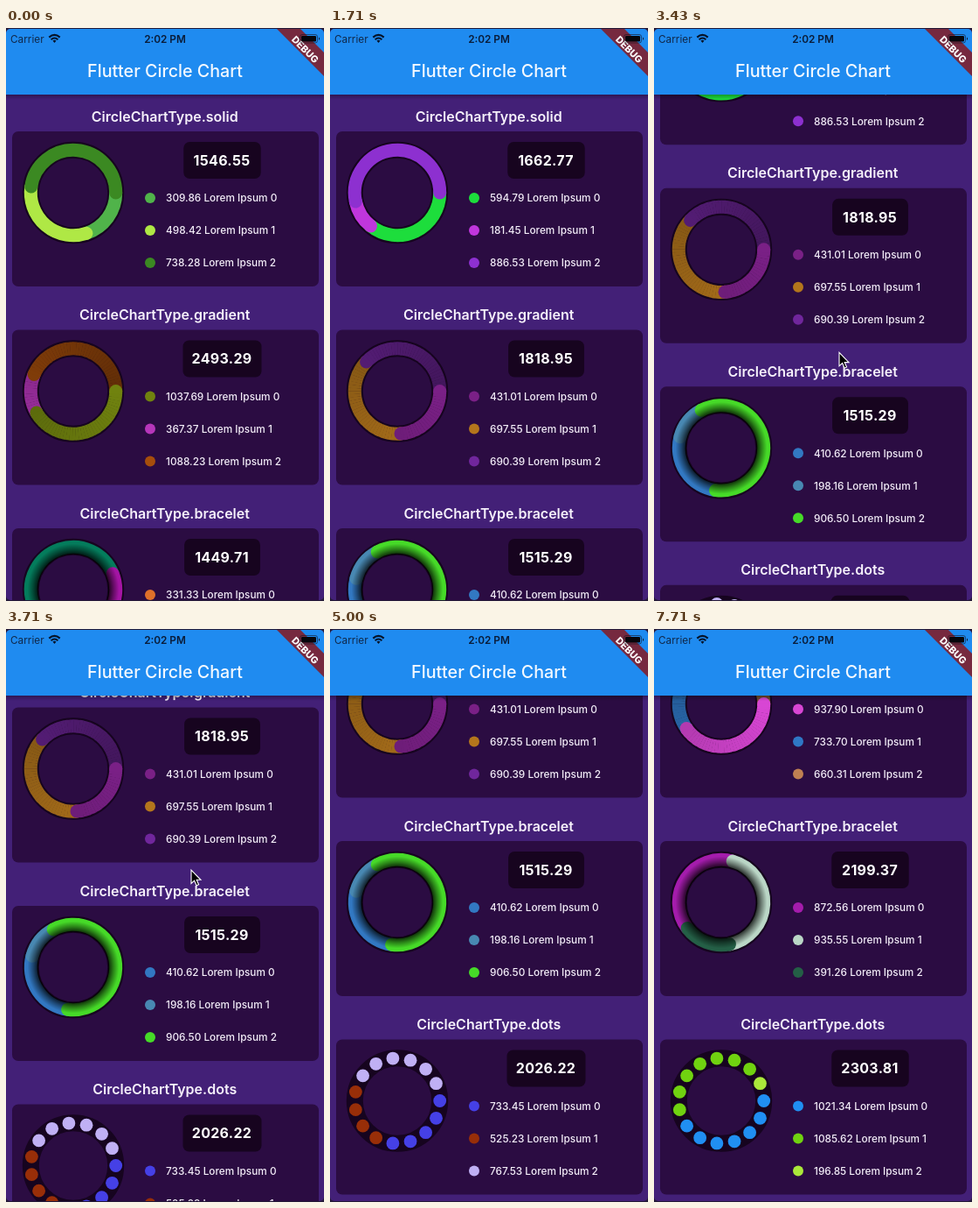
An HTML page for the animation above (8000 ms loop, 364 by 654 pixels).

```html
<!DOCTYPE html>
<html lang="en">
<head>
<meta charset="utf-8">
<title>Flutter Circle Chart</title>
<style>
html, body { margin: 0; width: 100%; height: 100%; overflow: hidden; background: #241a38; }
svg { display: block; width: 364px; height: 654px; font-family: Inter, Roboto, sans-serif; }
.title { font-size: 16px; font-weight: 600; fill: #f6f1fb; text-anchor: middle; }
.total { font-size: 16px; font-weight: 700; fill: #fff; text-anchor: middle; letter-spacing: .3px; }
.item { font-size: 11.8px; font-weight: 500; fill: #f3edf8; }
.status { font-size: 11.8px; fill: #10284a; }
</style>
</head>
<body>
<svg viewBox="0 0 364 654">
  <defs>
    <clipPath id="screen"><rect y="1" width="364" height="652" rx="5"/></clipPath>
    <radialGradient id="inner" gradientUnits="userSpaceOnUse" cx="77" cy="188" r="57">
      <stop offset=".7" stop-color="#000" stop-opacity=".85"/>
      <stop offset=".81" stop-color="#000" stop-opacity=".4"/>
      <stop offset=".92" stop-color="#000" stop-opacity="0"/>
    </radialGradient>
    <linearGradient id="drop" x2="0" y2="1">
      <stop stop-color="#000" stop-opacity=".3"/>
      <stop offset="1" stop-color="#000" stop-opacity="0"/>
    </linearGradient>
  </defs>
  <g clip-path="url(#screen)">
    <rect width="364" height="654" fill="#432077"/>
    <g id="list"></g>
    <rect y="76" width="364" height="6" fill="url(#drop)"/>
    <rect width="364" height="76" fill="#1f8bf0"/>
    <text x="182" y="56" text-anchor="middle" font-size="19.7" font-weight="500" fill="#f4f9ff">Flutter Circle Chart</text>
    <path d="M309 0H336L364 28V55Z" fill="#76293f"/>
    <text transform="translate(342.5 24.5) rotate(45)" y="4" text-anchor="middle" font-size="11" font-weight="800" fill="#fff">DEBUG</text>
    <text class="status" x="5" y="16.5">Carrier</text>
    <g fill="none" stroke="#06142a" stroke-width="2.1">
      <path d="M49.3 10.6Q55.5 5 61.7 10.6M51.6 13.2Q55.5 9.8 59.4 13.2"/>
      <path d="M53.5 14.6Q55.5 13 57.5 14.6L55.5 17Z" fill="#06142a" stroke="none"/>
    </g>
    <text class="status" x="182" y="16.5" text-anchor="middle" style="font-weight:600;fill:#0a1c38">2:02 PM</text>
    <rect x="336.5" y="7.5" width="20" height="9.5" rx="2.5" fill="none" stroke="#141420" stroke-opacity=".6"/>
    <rect x="338" y="9" width="17" height="6.5" rx="1.3" fill="#05060c"/>
    <path d="M358 10.5Q360 12.2 358 14Z" fill="#141420"/>
    <path id="cursor" d="M0 0V15.5L3.6 12.2 6 17.8 8.6 16.7 6.2 11.3H11Z" fill="#000" stroke="#fff" stroke-width="1.1"/>
  </g>
</svg>
<script>
const LOOP = 8000, STEP = 1000 / 7, PITCH = 226.5;
const CX = 77, CY = 188, RADIUS = 48.7, WIDTH = 15;

const solidA = [[309.857, '#50b34a'], [498.417, '#afe845'], [738.277, '#3b8922']];
const solidB = [[594.79, '#1ddd3c'], [181.45, '#c036dc'], [886.53, '#8d30d0']];
const dotsB = [[733.454, '#4540e6'], [525.233, '#982e08'], [767.533, '#c0b0f4']];
const dataSets = [
  { until: 6, charts: {
    solid: solidA,
    gradient: [[1037.69, '#70820f'], [367.37, '#b636ba'], [1088.23, '#a64e0c']],
    bracelet: [[331.33, '#e0702a'], [698.3, '#047c5c'], [420.08, '#a414a4']],
    dots: dotsB } },
  { until: 47, charts: {
    solid: solidB,
    gradient: [[431.01, '#7a2086'], [697.55, '#b4761c'], [690.39, '#70269c']],
    bracelet: [[410.623, '#3278c2'], [198.164, '#4888b2'], [906.503, '#46da28']],
    dots: dotsB } },
  { until: 56, charts: {
    solid: solidB,
    gradient: [[937.9, '#d846d4'], [733.7, '#2f78c6'], [660.31, '#c08052']],
    bracelet: [[872.56, '#a41cac'], [935.55, '#bad6c6'], [391.26, '#245f46']],
    dots: [[1021.34, '#208ff2'], [1085.62, '#70d210'], [196.85, '#aae83a']] } },
];

const point = deg => {
  const a = deg * Math.PI / 180;
  return [CX + RADIUS * Math.cos(a), CY + RADIUS * Math.sin(a)];
};
const arc = (from, to, color, cap = 'round') =>
  `<path d="M${point(from)}A${RADIUS} ${RADIUS} 0 ${+(to - from > 180)} 1 ${point(to)}"
    fill="none" stroke="${color}" stroke-width="${WIDTH}" stroke-linecap="${cap}"/>`;
const circle = (x, y, r, color) => `<circle cx="${x}" cy="${y}" r="${r}" fill="${color}"/>`;
const band = (width, color) =>
  `<circle cx="${CX}" cy="${CY}" r="${RADIUS}" fill="none" stroke="${color}" stroke-width="${width}"/>`;
const sum = items => items.reduce((total, [value]) => total + value, 0);

function shade(color, deg) {
  const k = 1 - 0.42 * Math.min(deg, 360) / 360;
  const channels = [1, 3, 5].map(i => Math.round(parseInt(color.slice(i, i + 2), 16) * k));
  return `rgb(${channels})`;
}

function segments(items, start) {
  const total = sum(items);
  return items.map(([value, color]) => {
    const from = start;
    start += value / total * 360;
    return { from, to: start, color };
  });
}

// The colour fades with the angle, so the arc is laid in short pieces.
function fadedArc({ from, to, color }) {
  const count = Math.ceil((to - from) / 4), size = (to - from) / count;
  let out = circle(...point(from), WIDTH / 2, shade(color, from)) +
            circle(...point(to), WIDTH / 2, shade(color, to));
  for (let i = 0; i < count; i++) {
    const a = from + i * size;
    out += arc(a, Math.min(a + size + 0.4, to), shade(color, a), 'butt');
  }
  return out;
}

const rings = {
  solid: items => segments(items, 0).map(s => arc(s.from, s.to, s.color)).join(''),
  gradient(items) {
    const [first, ...rest] = segments(items, 0);
    return [...rest, first].map(fadedArc).join('');
  },
  bracelet(items) {
    const start = items[0][0] / sum(items) * 360;
    return segments(items, start).map(s => arc(s.from, s.to, s.color)).join('') +
      band(WIDTH + 2, 'url(#inner)');
  },
  dots(items) {
    const total = sum(items), count = 15;
    const colors = items.flatMap(([value, color]) => Array(Math.round(value / total * count)).fill(color));
    return colors.map((color, i) => circle(...point(i * 360 / count), 7.4, color)).join('');
  },
};

function card([type, items], index) {
  const total = sum(items).toFixed(2);
  const boxWidth = 90 - 1.6 * (total.split('1').length - 1);
  const legend = items.map(([value, color], i) => {
    const y = 194 + 37 * i;
    return circle(165, y, 6, color) +
      `<text class="item" x="183" y="${y + 4.3}">${value.toFixed(2)} Lorem Ipsum ${i}</text>`;
  }).join('');
  return `<g transform="translate(0 ${index * PITCH})">
    <text class="title" x="181.7" y="106.6">CircleChartType.${type}</text>
    <rect x="7" y="118" width="351" height="177" rx="7" fill="#2b0c42"/>
    ${band(19, '#16041f')}${rings[type](items)}
    <rect x="${247.5 - boxWidth / 2}" y="130" width="${boxWidth}" height="42" rx="7" fill="#17041f"/>
    <text class="total" x="247" y="156.8">${total}</text>${legend}</g>`;
}

const list = document.getElementById('list');
const cursor = document.getElementById('cursor');
list.innerHTML = dataSets.map(set => `<g>${Object.entries(set.charts).map(card).join('')}</g>`).join('');
const pages = [...list.children];

function track(keys, t) {
  const i = keys.findIndex(([time]) => time > t);
  if (i === 0) return keys[0][1];
  if (i < 0) return keys[keys.length - 1][1];
  const [t0, v0] = keys[i - 1], [t1, v1] = keys[i];
  return v0 + (v1 - v0) * (t - t0) / (t1 - t0);
}
const scrollKeys = [[19, 0], [20, 2], [21, 13.5], [23, 115], [26, 255], [28, 314], [30, 332.5], [31, 330.5], [33, 329]];
const cursorKeys = [[19, 540], [20, 535], [21, 521], [23, 418], [26, 275], [28, 218], [30, 201]];

function draw(now) {
  const tick = Math.floor((now % LOOP + 8) / STEP) % 56;
  const current = dataSets.findIndex(set => tick < set.until);
  pages.forEach((page, i) => page.setAttribute('display', i === current ? 'inline' : 'none'));
  list.setAttribute('transform', `translate(0 ${-track(scrollKeys, tick)})`);
  const x = track([[26, 212], [30, 215]], tick);
  cursor.setAttribute('transform', `translate(${x} ${track(cursorKeys, tick)})`);
  cursor.setAttribute('display', tick >= 17 && tick < 34 ? 'inline' : 'none');
}

let begin;
function loop(now) {
  begin ??= now;
  draw(Math.max(0, now - begin));
  requestAnimationFrame(loop);
}
draw(0);
requestAnimationFrame(loop);
</script>
</body>
</html>
```
